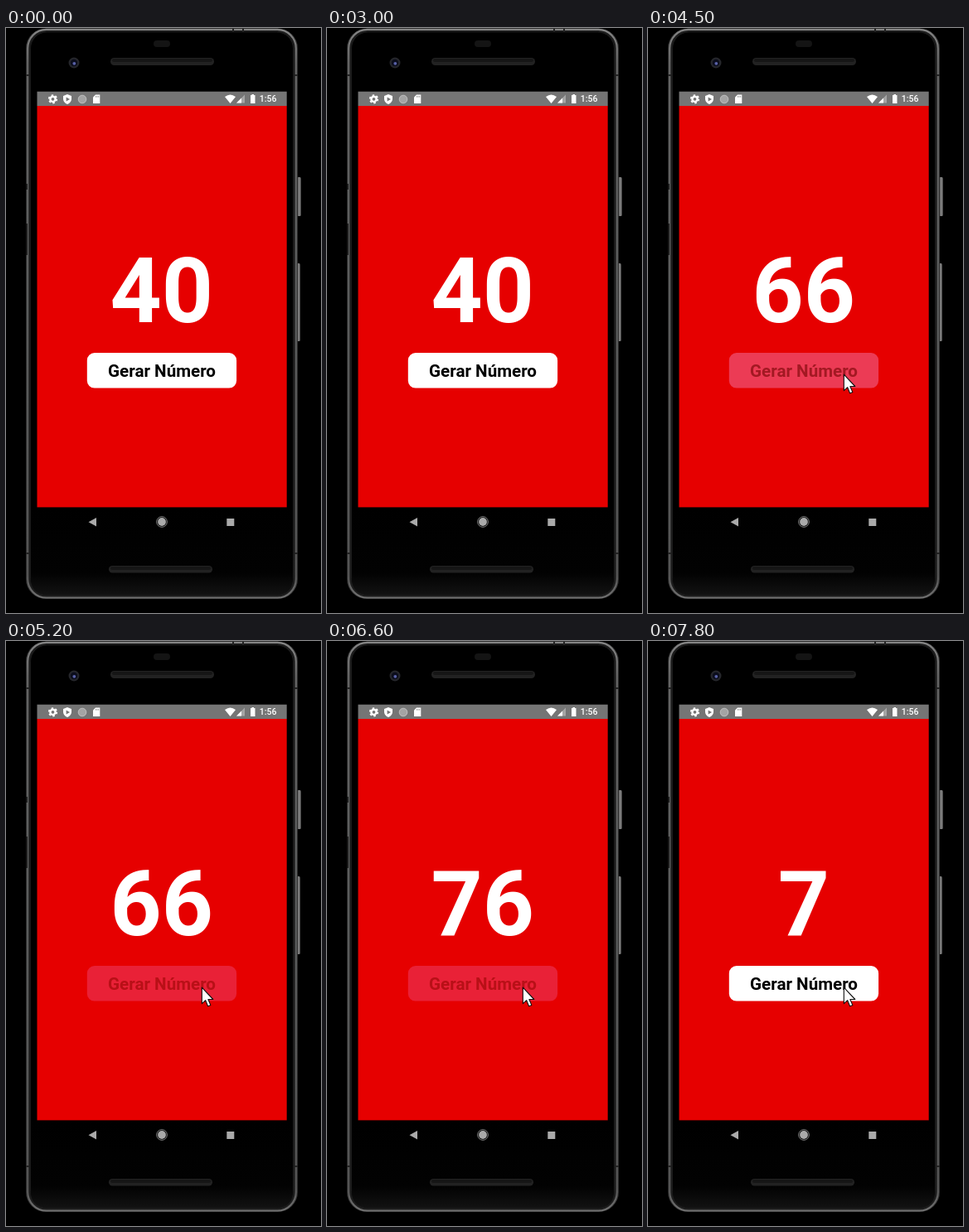
Recreate the animation shown at these times as an HTML page. Size 380 by 706 pixels, loop 8000 ms.

```html
<!DOCTYPE html>
<html lang="pt">
<head>
<meta charset="utf-8">
<title>Gerar Número</title>
<style>
html, body { margin: 0; width: 100%; height: 100%; overflow: hidden; background: #000; }
svg { display: block; width: 380px; height: 706px; }
text { font-family: Roboto, sans-serif; }
</style>
</head>
<body>
<svg viewBox="0 0 380 706">
  <defs>
    <linearGradient id="rim" x1="0" y1="0" x2="0" y2="1">
      <stop offset="0" stop-color="#858585"/>
      <stop offset=".06" stop-color="#666"/>
      <stop offset=".5" stop-color="#5c5e5e"/>
      <stop offset=".96" stop-color="#565656"/>
      <stop offset="1" stop-color="#707070"/>
    </linearGradient>
    <linearGradient id="chin" x1="0" y1="0" x2="0" y2="1">
      <stop offset="0" stop-color="#000"/>
      <stop offset=".75" stop-color="#020202"/>
      <stop offset="1" stop-color="#121212"/>
    </linearGradient>
    <linearGradient id="key">
      <stop offset="0" stop-color="#333"/>
      <stop offset=".55" stop-color="#8c8c8c"/>
      <stop offset="1" stop-color="#444"/>
    </linearGradient>
  </defs>
  <rect width="380" height="706" fill="#000"/>

  <!-- phone body -->
  <rect x="351" y="180" width="5" height="47" rx="1.5" fill="url(#key)"/>
  <rect x="350.5" y="284" width="4.5" height="94" rx="1.5" fill="url(#key)"/>
  <rect x="24" y=".5" width="328" height="688.5" rx="24" fill="#303030"/>
  <rect x="26.2" y="1.9" width="323.6" height="685.6" rx="22.5" fill="#1c1c1c" stroke="url(#rim)" stroke-width="2.2"/>
  <rect x="29.5" y="4.800" width="317" height="679.5" rx="20" fill="#000" stroke="#1a1a1a"/>
  <path d="M30 579H346V664Q346 684 326 684H50Q30 684 30 664Z" fill="url(#chin)"/>
  <path d="M24 57h4M348 57h4M24 634h4M348 634h4M274 1v4M286 1v4" stroke="#222" stroke-width="2"/>
  <path d="M25 188v7M25 236v38" stroke="#1b1b1b" stroke-width="2"/>
  <rect x="178" y="15" width="20" height="8" rx="4" fill="#141414"/>
  <rect x="126" y="36" width="125" height="9" rx="4.5" fill="#222"/>
  <rect x="128" y="37" width="121" height="4" rx="2" fill="#161616"/>
  <rect x="124" y="649" width="125" height="8.5" rx="4.2" fill="#222"/>
  <rect x="126" y="650" width="121" height="4" rx="2" fill="#161616"/>
  <circle cx="82" cy="42" r="6.5" fill="#25262b"/>
  <circle cx="82" cy="42" r="4.2" fill="#0b0d1c"/>
  <circle cx="82.300" cy="42.800" r="1.900" fill="#5a62a8"/>

  <!-- screen -->
  <rect x="37.500" y="76.700" width="301.200" height="17.300" fill="#757575"/>
  <rect x="37.500" y="94" width="301.200" height="484.400" fill="#e60000"/>
  <g fill="#fff">
    <circle cx="56.5" cy="85.8" r="3.1" fill="none" stroke="#fff" stroke-width="2.4"/>
    <circle cx="56.5" cy="85.8" r="4.8" fill="none" stroke="#fff" stroke-width="1.6" stroke-dasharray="2.5 2.527"/>
    <path d="M74 80L79 82V86Q78.500 90 74 92Q69.500 90 69 86V82Z"/>
    <path d="M72.600 83.400L77 86L72.600 88.600Z" fill="#757575"/>
    <circle cx="92" cy="86" r="4.8" fill="#a4a4a4" stroke="#c4c4c4" stroke-width=".9"/>
    <path d="M108 80.500H113.300V91H105V83.500Z"/>
    <path d="M108.300 82v1.700M110 82v1.700M111.700 82v1.700" stroke="#757575" stroke-width=".7"/>
    <path d="M264 83Q270.500 78 277 83L270.500 91Z"/>
    <path d="M288 80.500V90.500H278Z" fill="#a5a5a5"/>
    <path d="M284 84.500V90.500H278Z"/>
    <path d="M296.500 80H299V81H300.500V91H295V81H296.500Z"/>
    <text x="305.700" y="89.400" font-size="10.500" font-weight="500">1:56</text>
  </g>
  <g fill="#aaa">
    <path d="M99.500 596.200L109 591V601.400Z"/>
    <circle cx="188" cy="596" r="4.900"/>
    <circle cx="188" cy="596" r="6.300" fill="none" stroke="#888" stroke-width="1"/>
    <rect x="266.300" y="592" width="9" height="9"/>
  </g>

  <text id="number" x="187.800" y="354.800" font-size="108.500" font-weight="700" text-anchor="middle" fill="#fff"></text>
  <rect id="button" x="97.800" y="392.100" width="180.300" height="42.500" rx="9"/>
  <text id="label" x="188" y="421" font-size="20.600" font-weight="700" text-anchor="middle">Gerar Número</text>
  <path id="cursor" d="M0 0V19.500L4.400 15.500L7.300 22.500L10.500 21.200L7.600 14.300H13.500Z" fill="#fff" stroke="#111" stroke-width="1.100" stroke-linejoin="round"/>
</svg>
<script>
const LOOP = 8000, STEP = 100, DIM = 0.13;
const taps = [
  { press: 4200, change: 4400, release: 4440, fade: 250, value: 66 },
  { press: 5200, change: 5500, release: 5550, fade: 350, value: 71 },
  { press: 6300, change: 6600, release: 6600, fade: 400, value: 76 },
  { press: 7300, change: 7400, release: 7400, fade: 400, value: 7 }
];
const [number, button, label, cursor] =
  ["number", "button", "label", "cursor"].map(id => document.getElementById(id));
const clamp = v => Math.min(1, Math.max(0, v));
const inOut = v => v < 0.5 ? 2 * v * v : 1 - 2 * (1 - v) ** 2;
const rgb = (...c) => `rgb(${c.map(Math.round).join()})`;

function draw(time) {
  const t = Math.floor(time / STEP) * STEP;
  let value = 40, alpha = 1;
  for (const tap of taps) {
    if (t >= tap.change) value = tap.value;
    if (t >= tap.press) alpha = DIM + (1 - DIM) * inOut(clamp((t - tap.release) / tap.fade));
  }
  number.textContent = value;

  // The faded button leans slightly towards pink.
  const rest = 1 - alpha, mix = alpha * rest;
  button.setAttribute("fill", rgb(230 + 25 * alpha, 255 * alpha, 255 * alpha ** 0.75));
  label.setAttribute("fill", rgb(212 * rest, 140 * mix, 200 * mix));

  const left = (1 - clamp((t - 3300) / 500)) ** 2;
  cursor.setAttribute("transform", `translate(${236.3 + 205 * left} ${418.2 - 80 * left})`);
  cursor.setAttribute("visibility", t < 3400 ? "hidden" : "visible");
}

const start = performance.now();
function tick() {
  draw((performance.now() - start) % LOOP);
  requestAnimationFrame(tick);
}
tick();
</script>
</body>
</html>
```
